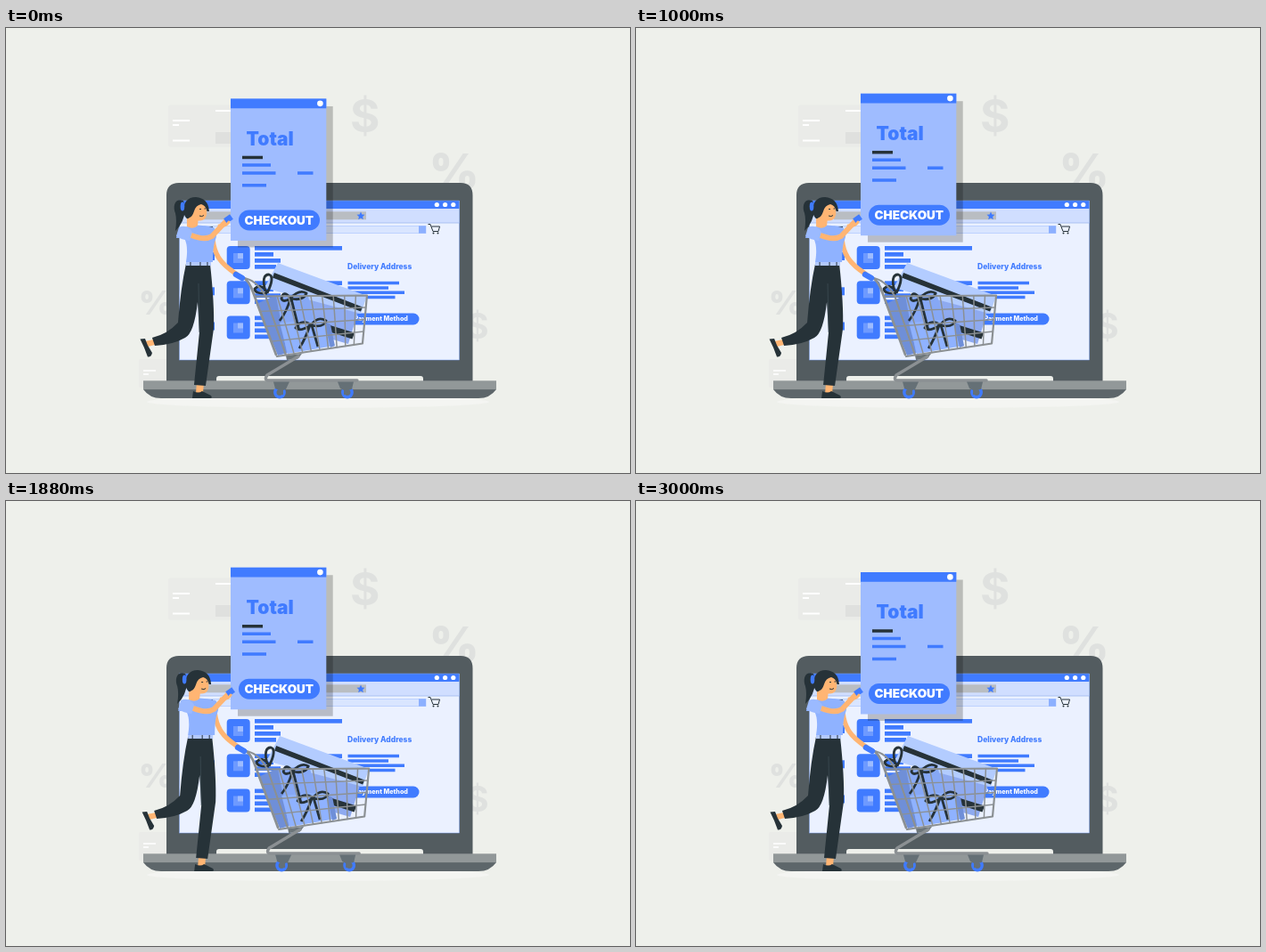
An HTML page that plays this animation: 700x500 px, repeating every 3040 ms.

```html
<!DOCTYPE html>
<html lang="en">
<head>
<meta charset="utf-8">
<title>Checkout</title>
<style>
  html, body { margin: 0; width: 100%; height: 100%; overflow: hidden; background: #eef0eb; }
  svg { display: block; width: 100vw; height: 100vh; }
  text { font-family: Inter, "Open Sans", sans-serif; font-weight: 900; }
</style>
</head>
<body>
<svg viewBox="0 0 700 500" xmlns="http://www.w3.org/2000/svg">
  <ellipse cx="350" cy="420" rx="192" ry="7" fill="#f4f5f2"/>

  <g id="backdrop" fill="#dfe1df">
    <rect x="182" y="86.500" width="76" height="47" rx="2" fill="#eaebe8"/>
    <rect x="235" y="117" width="22" height="13" fill="#dfe0de"/>
    <path d="M235 93h20M187 104h19M187 109h7M187 126.500h19" stroke="#fff" stroke-width="2"/>
    <rect x="149" y="372" width="46" height="32" rx="2" fill="#eaebe8"/>
    <path d="M154 385h14M154 389h6" stroke="#fff" stroke-width="1.600"/>
    <text x="386" y="116.500" font-size="51" style="font-weight:700">$</text>
    <text x="475" y="180" font-size="53">%</text>
    <text x="149" y="321.500" font-size="37">%</text>
    <text x="516" y="349" font-size="39" style="font-weight:700">$</text>
  </g>

  <g id="laptop">
    <path d="M180 397V188Q180 174 194 174H510Q523.500 174 523.500 188V397H468V394Q468 391 465 391H239Q236 391 236 394V397Z" fill="#535c60"/>
    <path d="M154 406H550Q543 416 530 416H174Q161 416 154 406Z" fill="#5d666a"/>
    <rect x="154" y="396.300" width="396" height="9.800" fill="#929899"/>
    <rect x="194.500" y="194" width="314" height="179" fill="#ebf1ff"/>
    <rect x="194.500" y="194" width="314" height="9" fill="#407bff"/>
    <rect x="194.500" y="203" width="314" height="16" fill="#d0deff"/>
    <path d="M194.500 219H508.500" stroke="#9fb9ee" stroke-width=".8"/>
    <rect x="194.500" y="194" width="314" height="179" fill="none" stroke="#7fa3f5" stroke-width=".5"/>
    <g fill="#fff"><circle cx="483.300" cy="198.500" r="2.600"/><circle cx="492.600" cy="198.500" r="2.600"/><circle cx="501.800" cy="198.500" r="2.600"/></g>
    <rect x="222" y="206.300" width="182" height="9" fill="#b9bdc2"/>
    <path d="M398 206.500l1.300 3 3.200.3-2.400 2.200.7 3.200-2.800-1.700-2.800 1.700.7-3.200-2.400-2.200 3.200-.3Z" fill="#407bff"/>
    <rect x="222" y="222.300" width="249" height="8.400" fill="#d9e5ff" stroke="#a9c3ff" stroke-width=".6"/>
    <rect x="463" y="222.300" width="8" height="8.400" fill="#8cb0ff"/>
    <rect x="222" y="223" width="10" height="2.500" fill="#263238"/>
    <path d="M473.500 220.500h2.500l3 8h6l1.500-5.500h-9" fill="none" stroke="#263238" stroke-width="1"/>
    <circle cx="479.500" cy="230.600" r="1" fill="#263238"/><circle cx="484.500" cy="230.600" r="1" fill="#263238"/>
    <g id="items"></g>
    <text x="383" y="270.600" font-size="8.500" fill="#407bff" style="font-weight:800">Delivery Address</text>
    <path d="M383.500 286.500h57.500M383.500 292h45.500M383.500 297.200h63.500M383.500 302.500h53" stroke="#407bff" stroke-width="3.500"/>
    <rect x="383.500" y="320.500" width="80" height="13" rx="6.500" fill="#407bff"/>
    <text x="390.500" y="329.400" font-size="7.200" fill="#fff" style="font-weight:800">Payment Method</text>
  </g>

  <g id="panel">
    <rect x="260" y="8.500" width="106.700" height="158.500" opacity=".22"/>
    <rect x="252" y="0" width="107.300" height="159.500" fill="#9fbcff"/>
    <rect x="252" y="0" width="107.300" height="10.800" fill="#407bff"/>
    <circle cx="352.400" cy="5.400" r="3.300" fill="#fff"/>
    <text x="269.500" y="52.500" font-size="21" fill="#407bff">Total</text>
    <path d="M265 66h23" stroke="#263238" stroke-width="3.500"/>
    <path d="M265 74.500h32M265 83.600h37.500M327 83.600h17.500M265 97.400h27" stroke="#407bff" stroke-width="3.500"/>
    <rect x="261" y="125" width="91" height="23" rx="11.500" fill="#407bff"/>
    <text x="306.300" y="141.200" text-anchor="middle" font-size="13.500" fill="#fff">CHECKOUT</text>
  </g>

  <g id="shopper">
    <g id="goods">
      <path d="M331 299L398 319 387 355 325 337Z" fill="#8eaaf0" transform="translate(-3 0)"/>
      <path d="M325 322L391 342.500 388.500 349.500 324 329Z" fill="#263238"/>
      <path d="M305 264L405 301 398 321 290 292Z" fill="#b3ccff"/>
      <path d="M301 275L400 313.500 398 318.500 299 280.500Z" fill="#263238"/>
      <path d="M281 310L303 300 324 363 305 368Z" fill="#6f8fd8"/>
      <path d="M303 301L338 297 352 355 315 365Z" fill="#86a8f5"/>
      <path d="M307 331L358 327 368 357 316 366Z" fill="#8fb2ff"/>
      <path d="M357 330L364 333 369 357 364 359Z" fill="#6f8fd8"/>
      <g fill="none" stroke="#263238" stroke-width="2.800">
        <path d="M291 296Q286 277 295 277Q302 279 293 298M293 297Q286 286 279 293Q279 299 293 298"/>
        <path d="M319 303Q311 294 309 304Q311 309 319 304Q329 293 337 298Q334 307 319 304M319 304Q315 319 307 329M320 304L329 340"/>
        <path d="M342 333Q330 327 325 337Q329 342 342 334Q350 323 359 329Q357 337 342 334M341 334Q336 349 329 360M343 334L350 358"/>
      </g>
    </g>

    <g id="cart" fill="none" stroke="#8b9093" stroke-linecap="round" stroke-linejoin="round">
      <path d="M314 368L332 366 327 372 315 373Z" fill="#6c7579" stroke="none"/>
      <path d="M328 369L293 390Q289 396 295 396H394" stroke-width="3.400"/>
      <path d="M264 279Q273 283 278 299L303 367" stroke-width="2.800"/>
      <path d="M266 281Q280 282 291 301L314 367" stroke-width="2"/>
      <path id="mesh" stroke-width="1.500"/>
      <path d="M279 301.500L405 300.500 400 354.500 304 369" stroke-width="2.200"/>
      <g stroke="#407bff" stroke-width="3.400" fill="#657076">
        <circle cx="307" cy="409.500" r="5.200"/><circle cx="383" cy="409.500" r="5.200"/>
      </g>
      <g fill="#657076" stroke="none">
        <path d="M300 397.500h18l-4 8.500-3 1v5h-5v-5l-4-2Z"/><path d="M372 397.500h18l-2 8.500-4 1v5h-5v-5l-4-2Z"/>
      </g>
    </g>

    <g id="woman">
      <path d="M232 238C234 255 241 265 258 276" fill="none" stroke="#ffb573" stroke-width="5.500" stroke-linecap="round"/>
      <path d="M258 277L265 281" stroke="#407bff" stroke-width="6.500" stroke-linecap="round"/>
      <path d="M156 352L166 350 167 356 159 358Z" fill="#ffb573"/>
      <path d="M150.500 349.500L156 349 159 356.500 164 365Q163 370 159 369.500L155 359Z" fill="#263238"/>
      <path d="M214 398h8l-1 13h-8Z" fill="#ffb573"/>
      <path d="M210 408Q216 411 220 408L230 413Q232 416 229 416H209Z" fill="#263238"/>
      <path d="M202 265H229Q234 310 233 338L224 402 211 401 217 342 215 308Q211 343 201 348Q187 356 167 357L164 348Q181 344 193 331Q196 292 202 265Z" fill="#263238"/>
      <path d="M216 287L217 342" stroke="#405057" stroke-width=".7"/>
      <path d="M202 263H230V267H202Z" fill="#b3c9ff"/>
      <path d="M207 262v5M218 262v5M226 262v5" stroke="#263238" stroke-width="1"/>
      <path d="M200 224Q213 219 233 224Q238 230 235 238Q232 245 232 263H202Q205 245 200 236L191 236Q193 226 200 224Z" fill="#8fb2ff"/>
      <path d="M199 194C189 190 187 201 190 208Q192 216 190 228Q200 219 201 203Z" fill="#263238"/>
      <path d="M203 208L216 213 215 222Q210 227 203 223Z" fill="#ffb573"/>
      <path d="M208 198Q214 193 223 197Q227 207 224 213Q221 218 213 216Q208 212 208 204Z" fill="#ffb573"/>
      <path d="M199 207Q199 190 213 190Q227 191 228 206L225.500 206Q224 199 219 198Q213 199 211 206Q209 212 206 213Q202 217 199 207Z" fill="#263238"/>
      <ellipse cx="198" cy="200.500" rx="2.300" ry="5" fill="#407bff"/>
      <path d="M217 203.500h2M222.500 203h1.500M217 211Q220 212.500 222 210.500" stroke="#263238" fill="none" stroke-width="1"/>
      <path d="M208 233Q223 239 231 234L247 217" fill="none" stroke="#ffb573" stroke-width="6" stroke-linecap="round" stroke-linejoin="round"/>
      <path d="M194 224Q203 220 209 229L206 239Q197 238 191 234Z" fill="#9bbaff"/>
      <path d="M246 217L253 212" stroke="#407bff" stroke-width="6.500"/>
      <path d="M239 222Q246 224 250 218" fill="none" stroke="#ffb573" stroke-width="3" stroke-linecap="round"/>
    </g>
  </g>
</svg>
<script>
  const LOOP = 3040, LEAD = 40;
  const SHAKE = [0, -1, 2, -4, 4, -4, 4, -4, 2, -1, 0];
  const byId = id => document.getElementById(id);
  const panel = byId("panel"), shopper = byId("shopper");
  const mix = (a, b, p) => a + (b - a) * p;

  function listItem(y) {
    const bar = (dy, w) => `<rect x="279" y="${y + dy}" width="${w}" height="4.700"/>`;
    return `<g fill="#407bff">
      <rect x="230" y="${y + 7}" width="4" height="9"/>
      <rect x="247.700" y="${y}" width="26" height="26" rx="4"/>
      <rect x="255" y="${y + 8}" width="11" height="11" fill="#6e9aff"/>
      <rect x="260" y="${y + 8}" width="6" height="6" fill="#9dbcff"/>
      ${bar(0, 98) + bar(7, 21) + bar(14, 29) + bar(21, 24)}</g>`;
  }
  byId("items").innerHTML = [245, 284.3, 323.5].map(listItem).join("");

  // Basket wires run between the rim and the sloping floor.
  function meshPath() {
    const at = (u, v) => `${mix(mix(279, 405, u), mix(304, 400, u), v)} ${mix(mix(301.5, 300.5, u), mix(369, 354.5, u), v)}`;
    let d = "";
    for (let i = 1; i < 10; i++) d += `M${at(i / 10, 0)}L${at(i / 10, 1)}`;
    for (let j = 1; j < 4; j++) d += `M${at(0, j / 4)}L${at(1, j / 4)}`;
    return d;
  }
  byId("mesh").setAttribute("d", meshPath());

  function shakeAt(phase) {
    const pos = phase * 10, i = Math.floor(pos);
    const eased = (1 - Math.cos(Math.PI * (pos - i))) / 2;
    return mix(SHAKE[i], SHAKE[i + 1], eased);
  }

  function draw(ms) {
    const phase = ((ms + LEAD) % LOOP) / LOOP;
    const float = Math.abs(1 - 2 * ((phase * 2) % 1));
    panel.setAttribute("transform", `translate(0 ${70 + 10 * float})`);
    shopper.setAttribute("transform", `translate(${shakeAt(phase)} 0)`);
  }

  const start = performance.now();
  function tick(now) {
    draw(Math.max(0, now - start));
    requestAnimationFrame(tick);
  }
  draw(0);
  requestAnimationFrame(tick);
</script>
</body>
</html>
```
